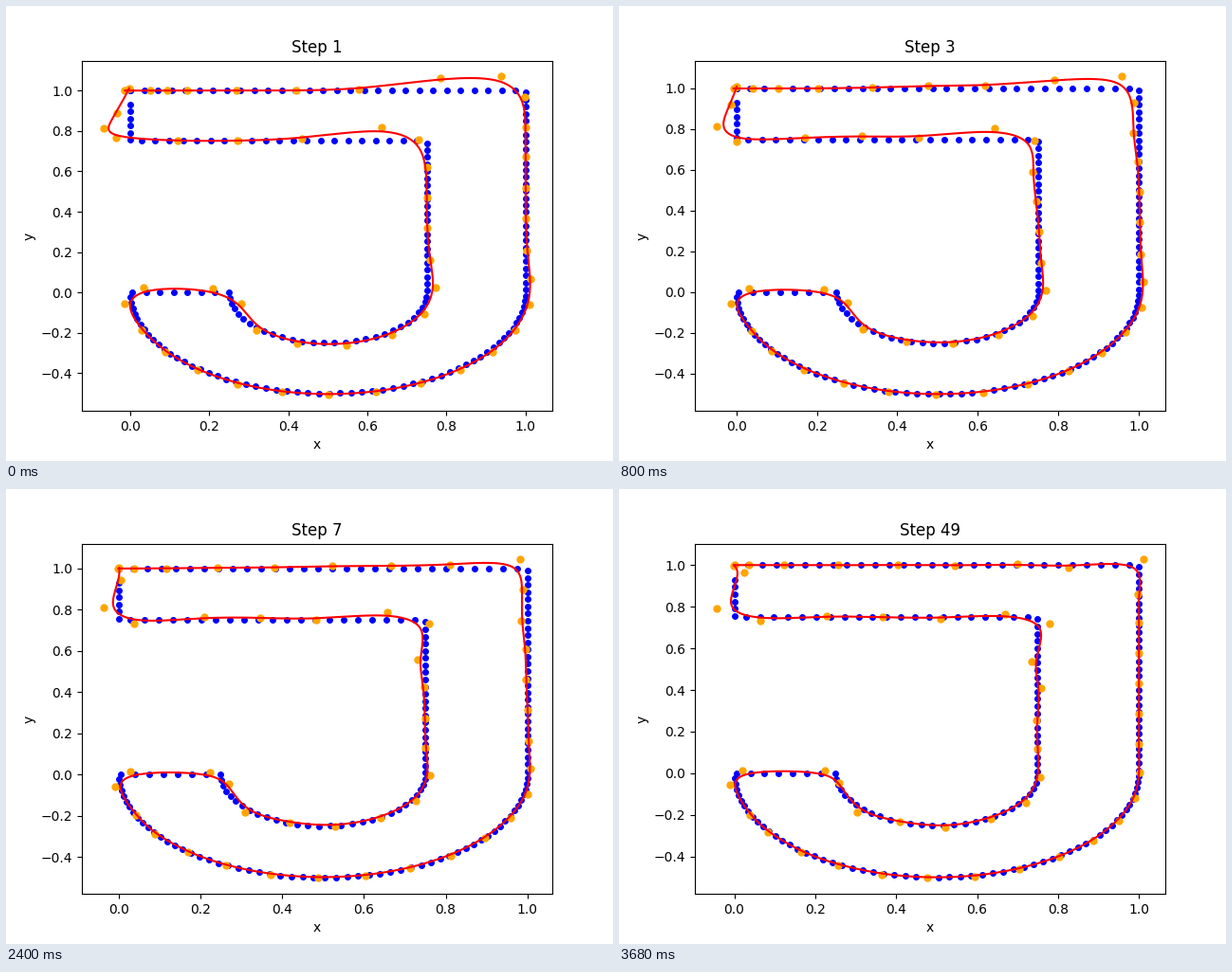
A matplotlib script that plays this animation: 640x480 px, repeating every 4000 ms.

```python
import numpy as np
import matplotlib.pyplot as plt
from matplotlib.animation import FuncAnimation

# Progressive least-squares fit of a cubic B-spline to a hook-shaped outline
STEPS = [1, 3, 5, 7, 49]
DEGREE = 3
CONTROLS = 51


def outline(t):
    """Point on the hook shape for t in [0, 7]."""
    if t < 1:
        return t, 1
    if t < 2:
        return 1, 2 - t
    if t < 4:
        a = (t - 2) * np.pi / 2
        return 0.5 + 0.5 * np.cos(a), -0.5 * np.sin(a)
    if t < 4.25:
        return t - 4, 0
    if t < 5.25:
        a = (t - 4.25) * np.pi
        return 0.5 - 0.25 * np.cos(a), -0.25 * np.sin(a)
    if t < 6:
        return 0.75, t - 5.25
    if t < 6.75:
        return 6.75 - t, 0.75
    return 0, t - 6


def chord_params(points):
    lengths = np.hypot(*np.diff(points, axis=0).T)
    total = np.r_[0, np.cumsum(lengths)]
    return total / total[-1]


def clamped_knots(params):
    """Interior knots spread evenly over the data indices."""
    spans = CONTROLS - DEGREE
    index = np.arange(1, spans) * len(params) / spans - 1
    inner = np.interp(index, np.arange(len(params)), params)
    return np.r_[[0] * (DEGREE + 1), inner, [1] * (DEGREE + 1)]


def bspline_basis(knots, params):
    """Basis matrix with one row per parameter."""
    u = np.minimum(params, 1 - 1e-12)[:, None]
    basis = ((knots[:-1] <= u) & (u < knots[1:])).astype(float)
    for d in range(1, DEGREE + 1):
        width = knots[d:] - knots[:-d]
        inverse = np.where(width > 0, 1 / np.where(width > 0, width, 1), 0)
        rise = (u - knots[:-d]) * inverse
        fall = (knots[d:] - u) * inverse
        basis = rise[:, :-1] * basis[:, :-1] + fall[:, 1:] * basis[:, 1:]
    return basis


def fit(points, basis):
    """Control polygons for the steps on show."""
    last = len(points) - 1
    start = np.arange(CONTROLS) * len(points) // (CONTROLS - 1)
    ctrl = points[np.minimum(start, last)]
    rate = 2 / basis.sum(axis=0).max()
    polygons = {}
    for step in range(1, STEPS[-1] + 1):
        ctrl = ctrl + rate * basis.T @ (points - basis @ ctrl)
        if step in STEPS:
            polygons[step] = ctrl
    return polygons


samples = np.array([outline(7 * i / 201) for i in range(200)] + [(0, 1)])
params = chord_params(samples)
knots = clamped_knots(params)
polygons = fit(samples, bspline_basis(knots, params))
curve_basis = bspline_basis(knots, np.linspace(0, 1, 500))

fig, ax = plt.subplots(figsize=(6.4, 4.8), dpi=100)


def draw(frame):
    step = STEPS[frame]
    ctrl = polygons[step]
    ax.clear()
    ax.scatter(*samples.T, s=16, color="blue")
    ax.scatter(*ctrl.T, s=25, color="orange")
    ax.plot(*(curve_basis @ ctrl).T, color="red")
    ax.set_xlabel("x")
    ax.set_ylabel("y")
    ax.set_title(f"Step {step}")


anim = FuncAnimation(fig, draw, frames=len(STEPS), interval=800,
                     init_func=lambda: None, repeat=True, repeat_delay=0)
plt.show()
```
